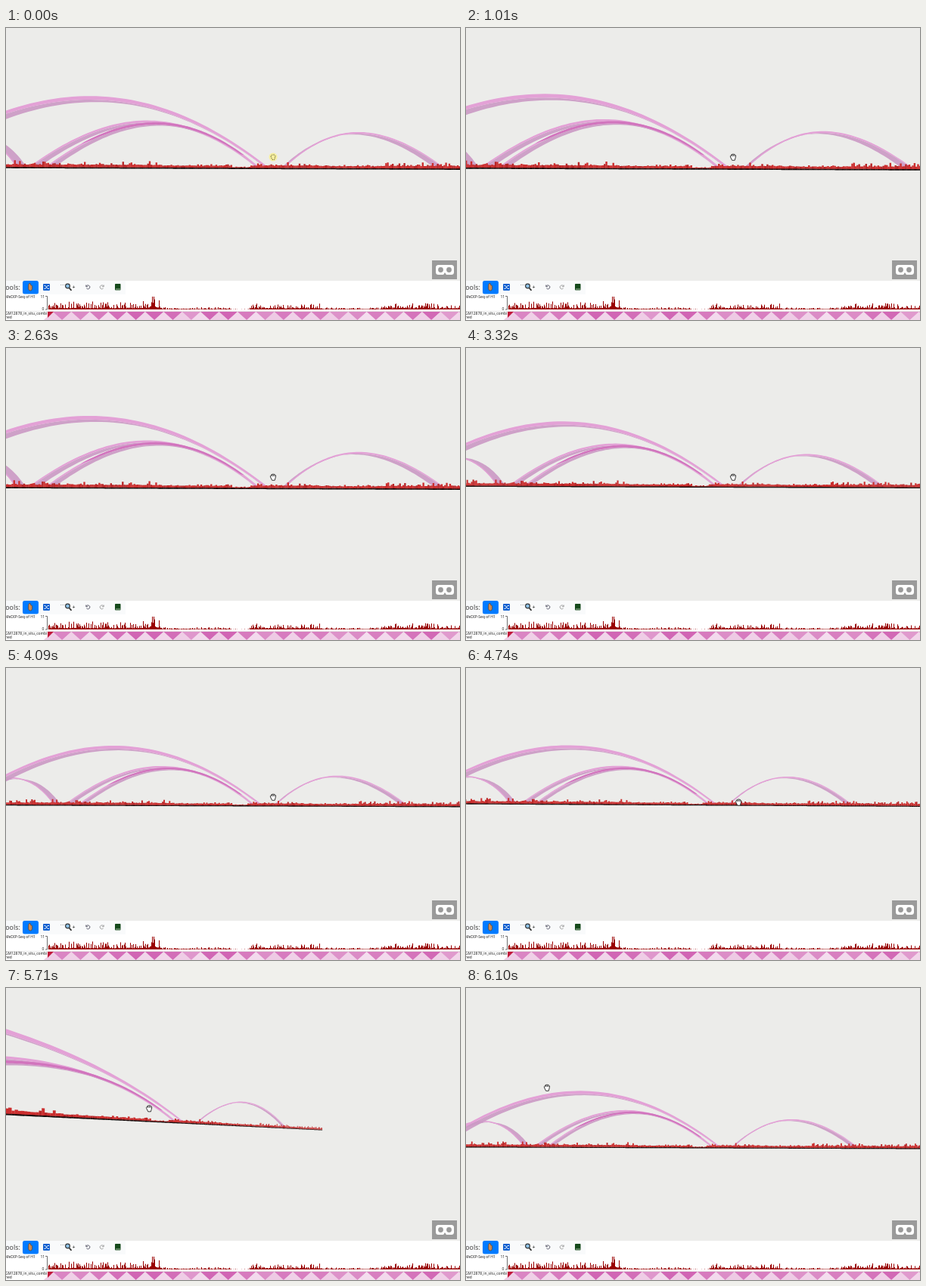
These frames come from a looping animation (600 px wide and 387 px high, 6.17 s). An HTML page with a canvas:

```html
<!DOCTYPE html>
<html lang="en">
<head>
<meta charset="utf-8">
<title>Genome arcs</title>
<style>
  html, body { margin: 0; width: 100%; height: 100%; overflow: hidden; background: #fff; }
  canvas, svg { position: absolute; left: 0; top: 0; display: block; }
  text { font-family: "Noto Sans", "Open Sans", sans-serif; fill: #222; }
</style>
</head>
<body>
<canvas id="scene" width="600" height="335"></canvas>
<svg width="600" height="387" viewBox="0 0 600 387">
  <rect x="563" y="308" width="33" height="25" fill="#9a9a9a"/>
  <rect x="568" y="314" width="24" height="13" rx="3.5" fill="#fff"/>
  <g fill="#9a9a9a">
    <circle cx="574.5" cy="320.5" r="3.4"/>
    <circle cx="585.5" cy="320.5" r="3.4"/>
    <path d="M578 327l2-3 2 3z"/>
  </g>

  <rect y="335" width="600" height="52" fill="#fff"/>
  <rect y="335" width="158" height="18" fill="#f9fafb"/>
  <text x="-5" y="346.500" font-size="8.800" style="fill:#444">Tools:</text>
  <rect x="22" y="335" width="21" height="17.500" rx="2.500" fill="#007bff"/>
  <path d="M29.500 343v-2.500l1.300-2h1.200l.6 2 2 1.200v4l-1.200 2.300h-2.400l-1.500-2z" fill="#c98a55" stroke="#4c3325" stroke-width=".6"/>
  <rect x="49" y="339" width="9" height="9" rx="1" fill="#0d5fd0"/>
  <path d="M50.500 341.500h1.500l3 4h2M50.500 345.500h1.500l3-4h2" fill="none" stroke="#fff" stroke-width=".9"/>
  <path d="M72 340.500h5" stroke="#999" stroke-width=".8" stroke-dasharray="1 1"/>
  <path d="M83.500 344.500l3 3.300" stroke="#333" stroke-width="1.800"/>
  <circle cx="81.500" cy="342" r="2.900" fill="#8fc3e8" stroke="#333" stroke-width="1.100"/>
  <text x="87.500" y="346" font-size="7">+</text>
  <g fill="none" stroke="#556" stroke-width=".9">
    <path d="M106 342.500a2.500 2.500 0 1 1 .4 2.500M105.800 340.500v2.300h2.300"/>
    <path d="M129 342.500a2.500 2.500 0 1 0-.4 2.500M129.200 340.500v2.300h-2.300" stroke="#999"/>
  </g>
  <rect x="144" y="339" width="7.500" height="8.500" rx=".8" fill="#174a1c"/>
  <path d="M145 346h6" stroke="#d8e4d4" stroke-width=".7"/>

  <text x="-1" y="358" font-size="5">MeDIP-Seq of H1</text>
  <text x="45.500" y="357.500" font-size="5">11</text>
  <text x="47.500" y="374" font-size="5">0</text>
  <path d="M52 355.500h2.500v17.500H52" fill="none" stroke="#333" stroke-width=".7"/>
  <path id="signal" fill="#990000"/>
  <path d="M0 375.500h600" stroke="#ddd" stroke-width=".7"/>
  <text x="-1" y="380" font-size="4.900">GM12878_in_situ_combi</text>
  <text x="-1" y="385" font-size="4.900">ned</text>
  <g id="heat"></g>
</svg>
<script>
const LOOP = 6170, STEP = 70;
const FOCAL = 200, EYE = 19, RIBBON = 9.5, LEAN = 9;
const ctx = document.getElementById('scene').getContext('2d');

function seeded(s) {
  return () => {
    s = (s + 0x6D2B79F5) | 0;
    let r = Math.imul(s ^ (s >>> 15), 1 | s);
    r = (r + Math.imul(r ^ (r >>> 7), 61 | r)) ^ r;
    return ((r ^ (r >>> 14)) >>> 0) / 4294967296;
  };
}

const ramp = (t, a, b) => Math.min(1, Math.max(0, (t - a) / (b - a)));
const smooth = x => x * x * (3 - 2 * x);

// Dolly in, dolly out, then swing right and back while tilting up
function camera(t) {
  const swing = smooth(ramp(t, 4600, 5420)) - smooth(ramp(t, 5420, 6030));
  return {
    dist: 200 - 27 * ramp(t, 700, 1680) + 68 * ramp(t, 1750, 3920) + 15 * ramp(t, 4000, 5100),
    turn: .845 * swing,
    slope: .0035 + .13 * swing,
    horizon: 166.5 - 15 * swing + 30 * ramp(t, 5420, 6050)
  };
}

function pointer(t) {
  const lower = ramp(t, 4600, 4850), lift = ramp(t, 5250, 6050);
  return [353 + 20 * lower - 93 * ramp(t, 4850, 5250) - 173 * lift, 171 + 19 * lower - 58 * lift];
}

let view;
function project(u, h, z = 0) {
  const d = view.dist + z, depth = d + u * view.turn;
  if (depth < 50) return null;
  const x = 300 + FOCAL * (u - d * view.turn) / depth;
  const scale = FOCAL * Math.hypot(1, view.turn) / depth;
  return [x, view.horizon + view.slope * (x - 300) + (EYE - h) * scale];
}

function fill(points, color) {
  ctx.beginPath();
  for (const p of points) if (p) ctx.lineTo(...p);
  ctx.fillStyle = color;
  ctx.fill();
}

// Parabola over the axis that leans away from the viewer
function curve({ from, to, height }, z = 0, s0 = -1, s1 = 1) {
  const out = [], mid = (from + to) / 2, half = (to - from) / 2;
  for (let i = 0; i <= 60; i++) {
    const s = s0 + (s1 - s0) * i / 60, rise = 1 - s * s;
    out.push(project(mid + half * s, height * rise, z + LEAN * rise));
  }
  return out;
}

const inset = (a, t) => ({ from: a.from + t * .7, to: a.to - t * .7, height: a.height - t });
const band = (a, b, color) => fill([...a, ...b.reverse()], color);

const PINK = '#e3a1d6', MAUVE = 'rgba(203,153,197,.9)', DEEP = '#d174bd';
const arcs = [
  { from: -452, to: -285, height: 45, face: 2 },
  { from: -442, to: 48, height: 98, face: 5 },
  { from: -270, to: 34, height: 64.5, face: 3 },
  { from: -248, to: 36, height: 62, face: 3 },
  { from: 66, to: 281, height: 49.5, face: 2.2 }
];

function drawArcs() {
  for (const a of arcs) {
    const inner = inset(a, a.face);
    band(curve(inner), curve(inner, RIBBON), MAUVE);
    band(curve(a), curve(inner), PINK);
  }
  const shared = arcs[3];
  band(curve(shared, 0, -.7, .85), curve(inset(shared, 3), 0, -.6, .83), DEEP);
}

// Signal strength by stage position: end of zone, level
const zones = [[205, 1], [298, .3], [322, .04], [415, .8], [495, .25], [Infinity, .8]];
const level = x => zones.find(z => x < z[0])[1];

const WIDTH = 2.2, bars = [];
const rand = seeded(11);
for (let u = -560; u < 420; u += WIDTH) {
  const l = level(u + 300), r = rand();
  bars.push({ u, h: Math.min(1, l * 8) * 2.4 + l * (1 + 5 * r ** 4) + r * .9,
              color: rand() < .25 ? '#b72527' : '#cb2e2e' });
}

function drawBars() {
  const block = (u, low, high, color) => {
    const v = u + WIDTH + .15;
    fill([project(u, low), project(v, low), project(v, high), project(u, high)], color);
  };
  for (const { u, h, color } of bars) {
    block(u, -1.4, .6, '#140808');
    block(u, .2, h, color);
  }
}

const hand = new Path2D('M-3.500 0q-.6-2.200 1-2.200q.2-1.900 1.600-1.300q.9-1.100 1.800 0q1.400-.6 1.700.8q1.300.1.900 2l-.7 2.700-.6 2.300h-3.600z');
const fingers = new Path2D('M-1.600-2.800v2M.2-3.200v2.200M1.900-2.700v1.900');

function drawPointer(t) {
  const early = t < 60;
  ctx.save();
  ctx.translate(...pointer(t));
  if (early || (t > 4900 && t < 5500)) {
    ctx.fillStyle = early ? '#f6efa0' : '#f4f260';
    ctx.beginPath();
    ctx.arc(0, 0, 5.5, 0, 7);
    ctx.fill();
    ctx.strokeStyle = '#55502a';
    ctx.setLineDash([2, 1]);
    ctx.scale(.8, .8);
    ctx.stroke(hand);
  } else {
    ctx.fillStyle = '#fff';
    ctx.strokeStyle = '#222';
    ctx.lineWidth = .9;
    ctx.fill(hand);
    ctx.stroke(hand);
    ctx.stroke(fingers);
  }
  ctx.restore();
}

function draw(time) {
  const t = Math.floor(time / STEP) * STEP;
  view = camera(t);
  ctx.fillStyle = '#ececea';
  ctx.fillRect(0, 0, 600, 335);
  drawArcs();
  drawBars();
  drawPointer(time < 60 ? 0 : Math.max(60, t));
}

function buildSignal() {
  const r = seeded(5);
  let d = '';
  for (let x = 56; x < 600; x++) {
    const burst = 1 + 1.2 * Math.exp(-(((x - 194) / 8) ** 2));
    const h = Math.min(17, level(x) * (1.5 + 9 * r() ** 2.5) * burst).toFixed(1);
    d += `M${x} 373v-${h}h1v${h}z`;
  }
  document.getElementById('signal').setAttribute('d', d);
}

function buildHeat() {
  const W = 24.4, r = seeded(8);
  const shade = light => `hsl(316 ${60 - light / 10}% ${light}%)`;
  let svg = '<rect x="55" y="376" width="545" height="11" fill="#f3cdea"/>';
  for (let x = 62; x < 600; x += W) {
    svg += `<path d="M${x} 376l${W / 2} 11h${-W}z" fill="${shade(86 + 6 * r())}"/>`;
    svg += `<path d="M${x} 376h${W}l${-W / 2} 11z" fill="${shade(60 + 14 * r())}"/>`;
  }
  svg += '<path d="M55 376h8l-8 8z" fill="#c2183c"/>';
  document.getElementById('heat').innerHTML = svg;
}

buildSignal();
buildHeat();
const start = performance.now();
function frame() {
  draw((performance.now() - start) % LOOP);
  requestAnimationFrame(frame);
}
frame();
</script>
</body>
</html>
```
